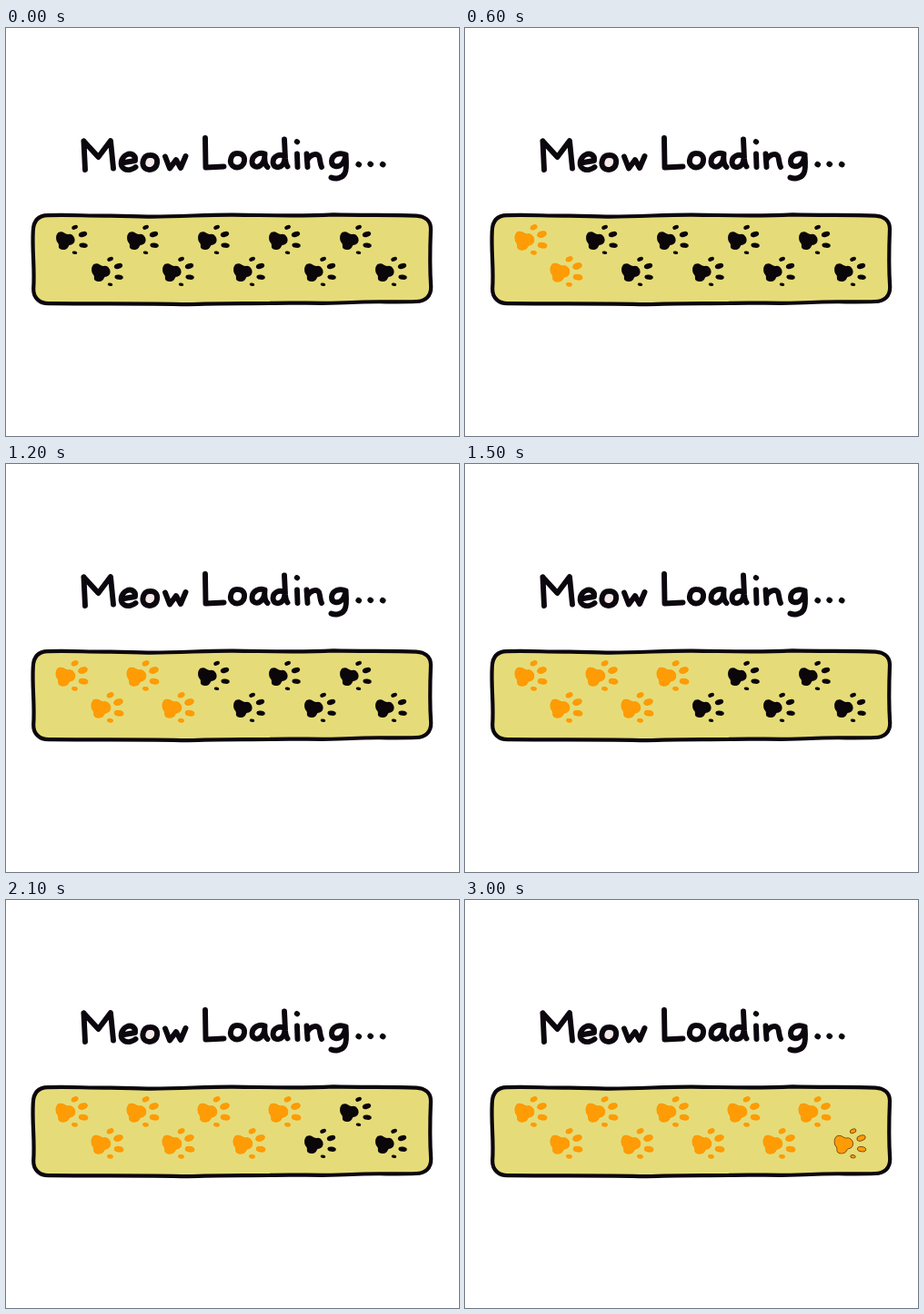
These frames come from a looping animation (498x449 px, 3300 ms). An HTML page:

```html
<!DOCTYPE html>
<html lang="en">
<head>
<meta charset="utf-8">
<title>Meow Loading...</title>
<style>
  html, body { margin: 0; width: 100%; height: 100%; overflow: hidden; background: #fff; }
  svg { position: absolute; left: 0; top: 0; width: 498px; height: 449px; }
  .ink { fill: none; stroke: #0c070e; stroke-linecap: round; stroke-linejoin: round; }
  .dark { fill: #0b0609; }
  .lit { fill: #ff9c05; stroke: #ff9c05; stroke-width: 1.3; }
  .lit .last { stroke: #6b3d0c; stroke-width: .7; }
  /* each step uncovers one more lit paw */
  .fill { animation: fill 3300ms steps(11, end) infinite; }
  @keyframes fill {
    from { clip-path: inset(0 445px 0 0); }
    to { clip-path: inset(0 16px 0 0); }
  }
</style>
</head>
<body>
<svg viewBox="0 0 498 449" role="img" aria-label="Meow Loading...">
  <defs>
    <g id="paw">
      <path d="M1.500 10.500C2.500 8.300 5.500 7.800 8 8.800C10 9.600 12 11.500 14 11C17.500 10 21 14 20.800 17.500C20.600 21 18 22.500 15.500 22.800C13.500 23.500 14 26 11.500 27.200C8 28.800 4 28 3.200 25.500C2.800 23.800 3.600 22.600 2.600 21C.8 19 .2 17 .3 14.500C.3 12.800 .8 11.500 1.500 10.500Z"/>
      <ellipse cx="20.800" cy="3.300" rx="3.500" ry="2.200" transform="rotate(-24 20.800 3.300)"/>
      <ellipse cx="29.700" cy="11" rx="4.800" ry="2.900" transform="rotate(-18 29.700 11)"/>
      <ellipse cx="30.300" cy="23.200" rx="4.700" ry="2.700" transform="rotate(8 30.300 23.200)"/>
      <ellipse cx="20.700" cy="31.300" rx="2.800" ry="1.700" transform="rotate(8 20.700 31.300)"/>
    </g>
  </defs>

  <g class="ink" stroke-width="5.900">
    <path d="M85.500 124.500L87 156M85.500 124.500L101.500 142L115 124L118 154.500"/>
    <path d="M127 148.500L142 146C143 139.500 137 137 132.500 139.500C126 143 124.500 151.500 130 155C134 157.500 139.500 155.500 142.500 153"/>
    <path fill="#f5e8e8" d="M158 140C150.500 140 148.500 150 152.500 154C157 158 165 155.500 166 149C167 143 163.500 139.500 158 140Z"/>
    <path d="M175 141.500L180 154.500L187 145L192 154L197.500 141"/>
    <path d="M219 121L219.500 153.500L239.500 152.500"/>
    <path d="M254.500 138C247 137.500 245 147.500 249 151.500C253.500 155.500 261 153 262 146.500C262.800 141 259.500 138 254.500 138Z"/>
    <path d="M284.500 138.500C278 136 271 140 270.500 146.500C270 152.500 276 154.500 280 151C283 148.500 284.500 143.500 284.500 138.500C284 144.500 284.500 150.500 287.500 153"/>
    <path d="M306.500 141.500C301 137.500 293.500 141 293.500 147.500C293.500 153.500 300 155 303.500 151C305.500 149 306.500 145.500 306.500 141.500M306 122.500L307 143.500C307.300 147.500 308 150.500 309.500 152.500"/>
    <path d="M320 138.500L320.500 153M319.800 125L320.200 125.300"/>
    <path d="M330.500 138.500L331.500 153M331 145.500C334 140 341 136.500 344 141C345.500 144 345 149.500 347 153"/>
    <path d="M373.500 139.500C367 136.500 358.500 139 358 146.500C357.800 153 365 154 369.500 149.500C372 147 373 143 373.500 139.500C374 147 375 155 372.500 160C369.500 165.500 362 166.500 357.500 164.500"/>
    <path d="M387.500 150L387.900 150.300M400.500 149.700L400.900 150M414 150L414.400 150.300" stroke-width="6.200"/>
  </g>

  <path class="ink" style="fill:#e5dc79" stroke-width="4.200" d="M46 206.200C70 205.200 90 207 115 206.600C135 206.700 145 208 160 207.600C195 207.500 220 205.400 250 205.600C290 206 320 207.400 360 205.400C395 206.400 425 205.200 451 206.600C460 207.200 467 211.500 467 221C466.200 240 465.600 262 467.200 285C467.400 295 461 300.800 451 301C425 302 405 300.400 380 302C350 304 320 301.700 290 302.900C260 303.300 230 302.800 200 304.200C150 302.700 95 303.700 47 303.200C37 303.300 30 297 30.200 287C31.800 265 28.500 245 29.800 223C30.300 211.500 36 206.400 46 206.200Z"/>
  <g class="dark"></g>
</svg>

<svg class="fill" viewBox="0 0 498 449" aria-hidden="true">
  <g class="lit"></g>
</svg>

<script>
  const count = 10;
  const paws = Array.from({ length: count }, (_, i) =>
    `<use href="#paw" x="${54.800 + 39 * i}" y="${216 + 35 * (i % 2)}"${i === count - 1 ? ' class="last"' : ''}/>`
  ).join('');
  for (const layer of document.querySelectorAll('.dark, .lit')) layer.innerHTML = paws;
</script>
</body>
</html>
```
